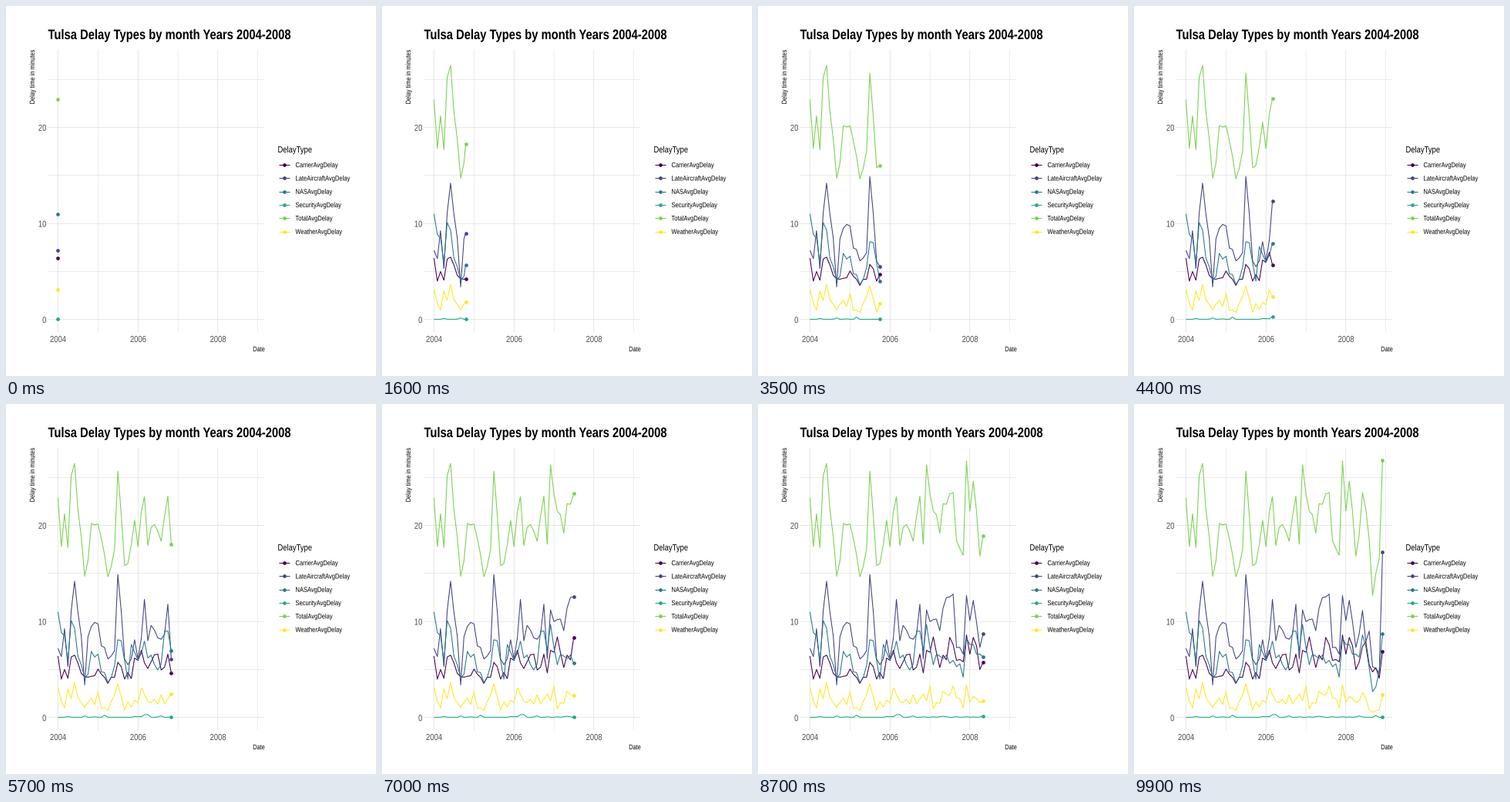
These frames come from a looping animation (480x480 px, 10 s). A matplotlib script:

```python
import numpy as np
import matplotlib.pyplot as plt
from matplotlib.animation import FuncAnimation
from matplotlib.patches import PathPatch
from matplotlib.textpath import TextPath
from matplotlib.transforms import Affine2D

SIZE, DPI = 480, 72
FRAMES, INTERVAL = 100, 100
NARROW = 0.82  # condensed sans face
LEFT, RIGHT, TOP, BOTTOM = 54.5, 335.5, 56.5, 423.4

carrier = [
    6.4, 4.0, 5.0, 4.1, 6.3, 6.5, 5.7, 4.6, 4.25, 4.2, 4.3, 4.35,
    5.05, 4.5, 4.2, 3.55, 4.2, 4.2, 5.75, 5.3, 4.0, 4.7, 4.05, 6.2,
    5.95, 7.0, 5.7, 5.1, 5.8, 6.55, 6.6, 4.95, 5.25, 6.6, 4.65, 7.0,
    6.8, 8.4, 6.8, 5.2, 6.5, 6.0, 8.35, 7.6, 5.95, 6.05, 5.8, 8.6,
    6.6, 8.35, 7.5, 5.0, 5.75, 7.4, 7.9, 5.5, 4.75, 5.2, 4.1, 6.9]
late = [
    7.2, 6.35, 9.25, 5.3, 11.1, 14.2, 11.0, 8.5, 3.4, 8.4, 9.5, 9.9,
    9.75, 7.45, 7.3, 6.1, 6.4, 6.95, 14.9, 11.1, 6.1, 5.5, 6.1, 8.1,
    6.1, 8.3, 12.3, 8.0, 9.6, 9.1, 8.3, 8.15, 8.7, 11.8, 6.1, 11.2,
    10.0, 10.2, 10.25, 9.05, 11.4, 12.5, 12.55, 12.85, 7.3, 7.3, 6.6, 12.7,
    10.1, 12.2, 10.0, 7.3, 8.7, 11.15, 7.9, 9.0, 5.3, 5.1, 4.6, 17.25]
nas = [
    11.0, 8.85, 8.5, 5.9, 10.1, 9.3, 6.4, 5.5, 4.1, 4.5, 6.9, 6.3,
    6.6, 4.75, 4.7, 3.65, 4.15, 5.4, 8.1, 8.0, 5.9, 4.0, 7.6, 6.8,
    6.0, 6.7, 7.95, 6.2, 6.5, 5.5, 4.95, 5.6, 9.0, 9.0, 7.0, 9.7,
    7.3, 5.5, 6.6, 6.4, 6.15, 6.5, 5.65, 5.95, 5.3, 5.6, 4.2, 8.3,
    7.6, 7.6, 6.6, 6.6, 6.3, 8.6, 7.4, 5.2, 2.7, 3.2, 4.9, 8.75]
weather = [
    3.15, 1.7, 1.0, 2.95, 2.0, 3.65, 2.1, 1.55, 1.05, 1.6, 2.0, 1.35,
    2.7, 0.95, 1.0, 0.75, 1.65, 2.4, 3.5, 2.2, 0.75, 1.65, 1.1, 1.8,
    1.55, 3.1, 2.4, 1.7, 1.55, 1.9, 1.4, 2.4, 1.4, 1.95, 2.45, 1.75,
    3.3, 0.9, 1.55, 1.5, 2.75, 2.4, 2.35, 3.3, 2.05, 1.95, 1.0, 3.4,
    1.6, 2.2, 2.0, 1.55, 1.75, 2.6, 2.0, 0.8, 0.55, 0.7, 0.85, 2.4]
total = [
    22.9, 17.8, 21.2, 17.7, 25.2, 26.45, 21.7, 18.8, 14.7, 16.3, 20.2, 20.05,
    20.15, 18.6, 17.0, 14.65, 15.7, 17.5, 25.65, 21.2, 15.8, 16.05, 18.0, 20.55,
    17.8, 21.4, 23.0, 17.9, 19.8, 20.1, 19.4, 18.35, 21.0, 23.05, 18.05, 26.3,
    23.3, 21.5, 21.1, 19.2, 22.25, 22.2, 23.3, 23.4, 18.4, 17.6, 16.9, 26.7,
    21.5, 24.6, 21.5, 16.8, 18.95, 23.4, 21.7, 18.6, 12.7, 15.0, 16.6, 26.75]
security = np.full(60, 0.03)
for month, value in {3: .12, 8: .18, 11: .08, 14: .26, 23: .11, 24: .1, 25: .09,
                     26: .3, 27: .32, 30: .06, 31: .18, 34: .08, 37: .08, 39: .1,
                     40: .13, 41: .08, 44: .1, 47: .1, 49: .07, 51: .06,
                     52: .17, 53: .07, 57: .2}.items():
    security[month] = value

SERIES = [
    ("CarrierAvgDelay", "#440154", carrier),
    ("LateAircraftAvgDelay", "#414487", late),
    ("NASAvgDelay", "#2A788E", nas),
    ("SecurityAvgDelay", "#22A884", security),
    ("TotalAvgDelay", "#7AD151", total),
    ("WeatherAvgDelay", "#FDE725", weather),
]

months = np.arange("2004-01", "2009-01", dtype="datetime64[M]").astype("datetime64[D]")
days = (months - months[0]).astype(int)
# every month lands on a whole step; steps in between are interpolated
steps = np.round(days / days[-1] * (FRAMES - 1))


def px(day):
    return 67.4 + 0.142 * np.asarray(day)


def py(value):
    return 406.8 - 12.465 * np.asarray(value)


fig = plt.figure(figsize=(SIZE / DPI, SIZE / DPI), dpi=DPI, facecolor="white")
ax = fig.add_axes([0, 0, 1, 1])
ax.set_xlim(0, SIZE)
ax.set_ylim(SIZE, 0)
ax.axis("off")


def label(x, y, text, size, ha="left", weight="normal", color="black", angle=0):
    prop = {"family": "Liberation Sans", "weight": weight}
    path = TextPath((0, 0), text, size=size, prop=prop)
    shift = {"left": 0, "center": 0.5, "right": 1}[ha] * path.get_extents().x1 * NARROW
    place = (Affine2D().scale(NARROW, -1).translate(-shift, 0)
             .rotate_deg(-angle).translate(x, y))
    ax.add_patch(PathPatch(place.transform_path(path), fc=color, lw=0))


def grid(xs, ys, width):
    style = dict(color="#cccccc", lw=width, snap=False, zorder=0,
                 solid_capstyle="butt")
    for x in xs:
        ax.plot([x, x], [TOP, BOTTOM], **style)
    for y in ys:
        ax.plot([LEFT, RIGHT], [y, y], **style)


grid(px([0, 731, 1461]), py([0, 10, 20]), 0.46)
grid(px([365.5, 1096, 1827]), py([5, 15, 25]), 0.36)

label(LEFT, 43, "Tulsa Delay Types by month Years 2004-2008", 18, weight="bold")
label(37, 57, "Delay time in minutes", 9, ha="right", angle=90)
label(335.5, 448, "Date", 9, ha="right")
for day, year in zip((0, 731, 1461), ("2004", "2006", "2008")):
    label(px(day), 436, year, 11.5, ha="center", color="#4d4d4d")
for value in (0, 10, 20):
    label(52, py(value) + 4.4, str(value), 11.5, ha="right", color="#4d4d4d")

label(352.5, 190, "DelayType", 11.5)
LINE = dict(lw=1.07, solid_capstyle="butt", solid_joinstyle="round")
DOT = dict(marker="o", ms=4.7, mew=0, ls="none")

lines, dots = [], []
for i, (name, color, _) in enumerate(SERIES):
    y = 206 + 17.3 * i
    ax.plot([354.3, 368.1], [y, y], color=color, **LINE)
    ax.plot([361.2], [y], color=color, **DOT)
    label(375.5, y + 3.2, name, 9.2)
    lines += ax.plot([], [], color=color, zorder=3, **LINE)
    dots += ax.plot([], [], color=color, zorder=4, **DOT)


def update(frame):
    shown = steps < frame
    x = px(np.append(days[shown], np.interp(frame, steps, days)))
    for line, dot, (_, _, values) in zip(lines, dots, SERIES):
        values = np.asarray(values)
        y = py(np.append(values[shown], np.interp(frame, steps, values)))
        line.set_data(x, y)
        dot.set_data(x[-1:], y[-1:])
    return lines + dots


anim = FuncAnimation(fig, update, frames=FRAMES, interval=INTERVAL,
                     repeat=True, repeat_delay=0)
plt.show()
```
